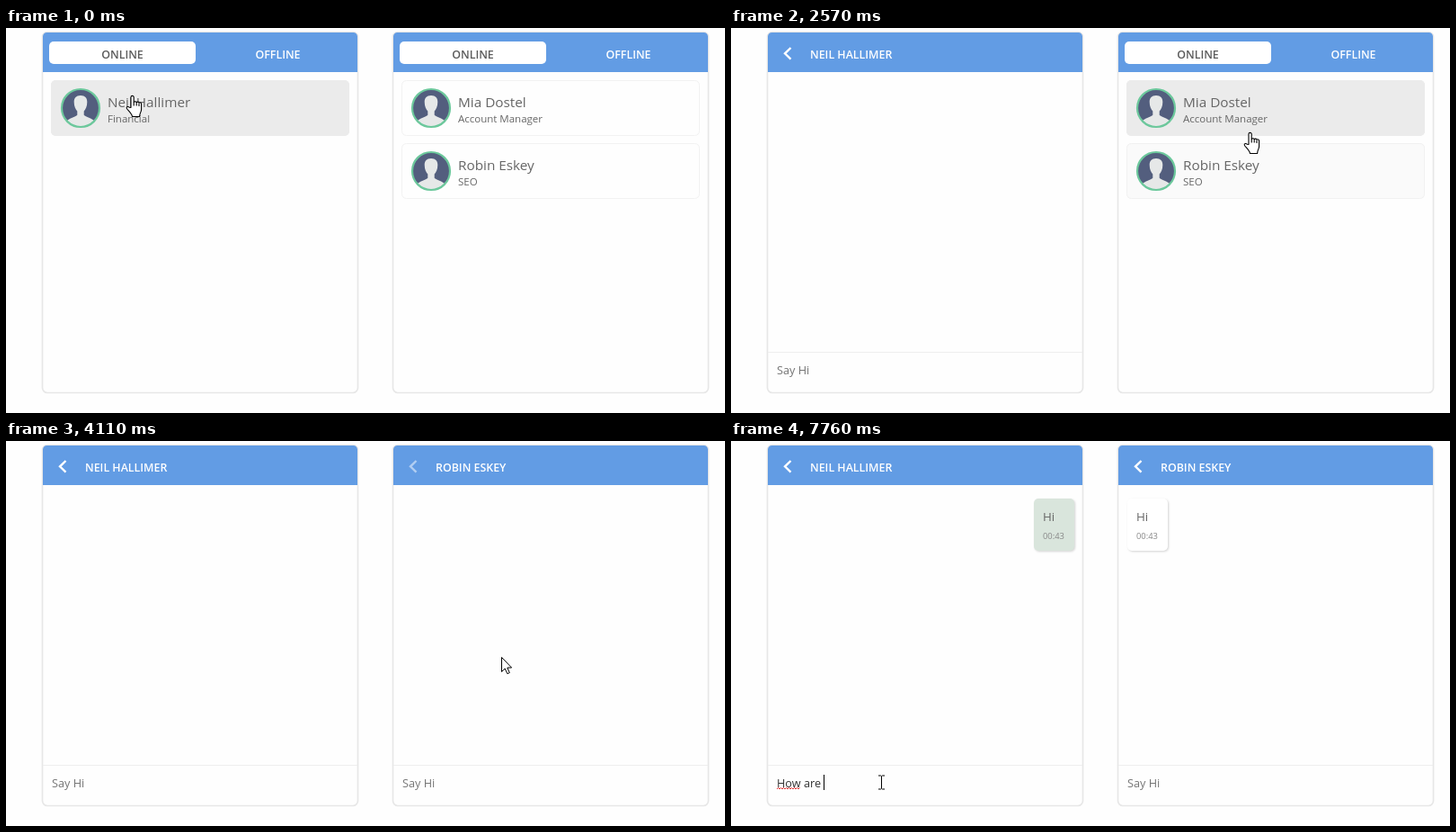
Recreate the animation shown at these times as an HTML page. Size 800 by 428 pixels, loop 8 s.

```html
<!DOCTYPE html>
<html lang="en">
<head>
<meta charset="utf-8">
<title>Chat widgets</title>
<style>
  html, body { margin: 0; width: 100%; height: 100%; overflow: hidden; background: #fefefe; }
  svg { display: block; width: 800px; height: 428px; }
  text { font-family: "Open Sans", "Noto Sans", sans-serif; fill: #666; white-space: pre; }
  .caps { font-size: 12.4px; font-weight: 600; fill: #fff; }
  .caps.on { fill: #5c5c5c; }
  .mid { text-anchor: middle; }
  .name { font-size: 15.3px; }
  .role { font-size: 11.5px; }
  .none { font-size: 15.3px; fill: #888; }
  .input { font-size: 12.7px; fill: #333; }
  .input.hint { fill: #757575; }
  .said { font-size: 13.3px; }
  .time { font-size: 9.4px; fill: #888; }
  .bubble { filter: drop-shadow(1px 1px 1px rgba(0, 0, 0, .17)); }
</style>
</head>
<body>
<svg id="stage" viewBox="0 0 800 428">
  <defs>
    <clipPath id="face"><circle cx="83" cy="89" r="20.5"/></clipPath>
    <g id="avatar">
      <circle cx="83" cy="89" r="21" fill="#535e7e"/>
      <g clip-path="url(#face)" fill="#e6e8e8">
        <path d="M83 75c5 0 7.3 3 7.3 7.2 0 5-1.8 8.300-3.600 10.300v4.200c2 2.400 9 3 12 7.300v8H67.300v-8c3-4.300 10-4.900 12-7.300v-4.200c-1.800-2-3.600-5.300-3.600-10.300C75.700 78 78 75 83 75z"/>
      </g>
      <circle cx="83" cy="89" r="21" fill="none" stroke="#6cc89c" stroke-width="2.2"/>
    </g>
  </defs>
  <g id="panels"></g>
  <g id="cursor" stroke="#000" stroke-linejoin="round">
    <path id="hand" fill="#fff" stroke-width="1.1" d="M-1.500 13V1.500a1.600 1.600 0 0 1 3.200 0V7.500a1.600 1.600 0 0 1 3-.3a1.600 1.600 0 0 1 2.800.6a1.500 1.500 0 0 1 2.600 1V15c0 3-2 4-2 8H0c0-3-6-8-6.300-9.500c-.3-1.800 2-2 3-.8zM1.700 7.500V11M4.700 7.500V11M7.500 8.500V11.500"/>
    <path id="arrow" fill="#fff" d="M.5.5V16.500L4.200 13L6.800 18.700L9.300 17.600L6.800 12H11.600Z"/>
    <path id="beam" fill="none" d="M-3.500-7.500H-.8L0-6.800L.8-7.500H3.500M0-6.800V6.800M-3.500 7.500H-.8L0 6.800L.8 7.500H3.500"/>
  </g>
</svg>
<script>
const LOOP = 8000;
const $ = id => document.getElementById(id);

// Pointer steps: time, x, y, shape
const POINTER = [
  [0, 140.5, 75.5, 'hand'], [300, 146, 96, 'hand'], [440, 165, 116, 'hand'],
  [580, 205, 104, 'hand'], [720, 227, 85, 'hand'],
  [1150, 227, 85, 'arrow'], [1270, 300, 125, 'arrow'], [1410, 400, 180, 'arrow'],
  [1550, 477, 212, 'arrow'],
  [1830, 500, 200, 'arrow'], [1980, 530, 183, 'hand'], [2120, 552, 165, 'hand'],
  [2270, 566, 148, 'hand'], [2420, 574, 132, 'hand'], [2570, 577.5, 116.5, 'hand'],
  [2720, 640, 62, 'hand'], [2850, 701, 21.5, 'hand'],
  [3110, 701, 21.5, 'hand'], [3240, 620, 23, 'hand'], [3380, 539.5, 24.5, 'hand'],
  [3530, 539.5, 24.5, 'hand'], [3660, 543.5, 64.5, 'hand'], [3820, 547, 140, 'hand'],
  [3970, 549, 165, 'arrow'], [4110, 551, 240, 'arrow'],
  [4240, 450, 290, 'arrow'], [4380, 300, 340, 'arrow'], [4530, 190, 376, 'beam'],
  [4670, 167.5, 379.5, 'beam']
];

const TYPED = [
  [0, ''], [5510, 'H'], [5660, 'Hi'], [5940, ''],
  [6780, 'H'], [6920, 'How'], [7060, 'How '],
  [7340, 'How a'], [7480, 'How ar'], [7620, 'How are'], [7760, 'How are ']
];
const CARET = [[0, false], [4670, true], [5240, false], [5510, true], [6470, false], [6780, true]];

const OPEN = { a: 1150, b: 3970 };
const TO_OFFLINE = 3110, TO_ONLINE = 3530;
const SENT = 5940, RECEIVED = 6210;

const row = (id, i, name, role) => `
  <g transform="translate(0 ${i * 70})">
    <rect x="50.5" y="58.5" width="331" height="61" rx="5" fill="none" stroke="#f2f2f2"/>
    <rect id="${id}row${i}" x="50" y="58" width="332" height="62" rx="5" fill="#ebebeb" opacity="0"/>
    <use href="#avatar"/>
    <text class="name" x="113" y="88">${name}</text>
    <text class="role" x="113" y="105">${role}</text>
  </g>`;

const tab = (id, name, x) => `
  <rect id="${id}pill${name}" x="${x}" y="15" width="163" height="25" rx="5" fill="#fff"/>
  <text id="${id}tab${name}" class="caps mid" x="${x + 81.5}" y="34">${name}</text>`;

const bubble = (id, x, fill) => `
  <g id="${id}bubble" opacity="0">
    <rect class="bubble" x="${x}" y="64" width="45" height="58" rx="5" fill="${fill}"/>
    <text class="said" x="${x + 10}" y="89">Hi</text>
    <text class="time" x="${x + 10}" y="109">00:43</text>
  </g>`;

const empty = id => `
  <g id="${id}empty">
    <rect x="199" y="184.500" width="42" height="27.500" rx="4.500" fill="#88b5ea"/>
    <path d="M195.500 197h33a4.500 4.500 0 0 1 4.500 4.500v18a4.500 4.500 0 0 1-4.500 4.500H210l-8.500 9v-9h-6a4.500 4.500 0 0 1-4.500-4.500v-18a4.500 4.500 0 0 1 4.500-4.500z" fill="#80c8fc"/>
    <path d="M200 205.500h13M200 210.700h25M200 216h25" stroke="#fff" stroke-width="1.6" stroke-linecap="round"/>
    <text class="none mid" x="216" y="261">No Contacts Found</text>
  </g>`;

const panel = (id, x, title, rows, bubbleX, bubbleFill) => `
  <g transform="translate(${x} 0)">
    <rect x="40.500" y="4.500" width="351" height="401" rx="5.500" fill="#fefefe" stroke="#e7e7e7" stroke-width="1.7"/>
    <path d="M41 49V9.500a4.500 4.500 0 0 1 4.500-4.500h341a4.500 4.500 0 0 1 4.500 4.500V49z" fill="#629ce4"/>
    <g id="${id}home">
      ${tab(id, 'ONLINE', 48)}${tab(id, 'OFFLINE', 221)}
      <g id="${id}list">${rows.map((r, i) => row(id, i, ...r)).join('')}</g>
      ${empty(id)}
    </g>
    <g id="${id}chat">
      <path id="${id}back" d="M66.500 22L60 28.300L66.500 34.600" fill="none" stroke="#fff" stroke-width="2.400"/>
      <text class="caps" x="88" y="34">${title.toUpperCase()}</text>
      <path d="M41 360.500H391" stroke="#eee"/>
      <text id="${id}input" class="input hint" x="51" y="385">Say Hi</text>
      ${bubble(id, bubbleX, bubbleFill)}
    </g>
  </g>`;

$('panels').innerHTML =
  panel('a', 0, 'Neil Hallimer', [['Neil Hallimer', 'Financial']], 337, '#d9e5dc') +
  panel('b', 390, 'Robin Eskey', [['Mia Dostel', 'Account Manager'], ['Robin Eskey', 'SEO']], 51, '#fff') +
  `<path id="wave" fill="none" stroke="#e03030"/>
   <rect id="caret" y="371" width="1" height="17" fill="#000"/>`;

const ramp = (t, start, span) => Math.min(1, Math.max(0, (t - start) / span));
const show = (id, on) => $(id).style.display = on ? '' : 'none';
const fade = (id, v) => $(id).setAttribute('opacity', v);
const indexAt = (table, t) => {
  let i = 0;
  while (i + 1 < table.length && table[i + 1][0] <= t) i++;
  return i;
};
const valueAt = (table, t) => table[indexAt(table, t)][1];

function over(step, left, i) {
  const p = POINTER[step];
  if (!p) return false;
  const x = p[1] - left, y = p[2] - i * 70;
  return x > 50 && x < 382 && y > 58 && y < 120;
}

function drawPanel(id, left, count, step, now, offline, enter) {
  const chatting = now >= OPEN[id];
  show(id + 'home', !chatting);
  show(id + 'chat', chatting);
  fade(id + 'back', ramp(now, OPEN[id], 280));

  const away = offline > .4 && now < TO_ONLINE;
  show(id + 'list', !away);
  show(id + 'empty', away);
  fade(id + 'empty', offline);
  fade(id + 'list', enter);
  $(id + 'list').setAttribute('transform', `translate(0 ${(1 - enter) * 12})`);
  fade(id + 'pillONLINE', 1 - offline);
  fade(id + 'pillOFFLINE', offline);
  $(id + 'tabONLINE').classList.toggle('on', !away);
  $(id + 'tabOFFLINE').classList.toggle('on', away);

  for (let i = 0; i < count; i++) {
    const level = over(step, left, i) ? 1 : over(step - 1, left, i) ? .22 : 0;
    fade(id + 'row' + i, enter < 1 ? .3 : level);
  }
}

function drawInput(t) {
  const text = valueAt(TYPED, t), input = $('ainput');
  input.textContent = text || 'Say Hi';
  input.classList.toggle('hint', !text);
  show('caret', valueAt(CARET, t));
  $('caret').setAttribute('x', 51 + (text ? Math.round(input.getComputedTextLength()) : 0));

  const marked = text.startsWith('How ');
  show('wave', marked);
  if (marked) {
    const end = 51 + input.getSubStringLength(0, 3);
    let d = 'M51 387';
    for (let x = 52.5, up = true; x <= end; x += 1.5, up = !up) d += `L${x} ${up ? 385.5 : 387}`;
    $('wave').setAttribute('d', d);
  }
}

function draw(t) {
  const step = indexAt(POINTER, t);
  const [now, x, y, shape] = POINTER[step];
  const back = now >= TO_ONLINE;
  const enter = back ? ramp(now, 3430, 250) : 1;
  const offline = back ? 1 - enter : now >= TO_OFFLINE ? ramp(now, 3040, 140) : 0;

  drawPanel('a', 0, 1, step, now, 0, 1);
  drawPanel('b', 390, 2, step, now, offline, enter);
  drawInput(t);
  fade('abubble', t < SENT ? 0 : ramp(t, SENT - 70, 140));
  fade('bbubble', t < RECEIVED ? 0 : ramp(t, RECEIVED - 70, 140));

  $('cursor').setAttribute('transform', `translate(${x} ${y})`);
  for (const s of ['hand', 'arrow', 'beam']) show(s, s === shape);
}

const start = performance.now();
function frame() {
  draw((performance.now() - start) % LOOP);
  requestAnimationFrame(frame);
}
frame();
</script>
</body>
</html>
```
